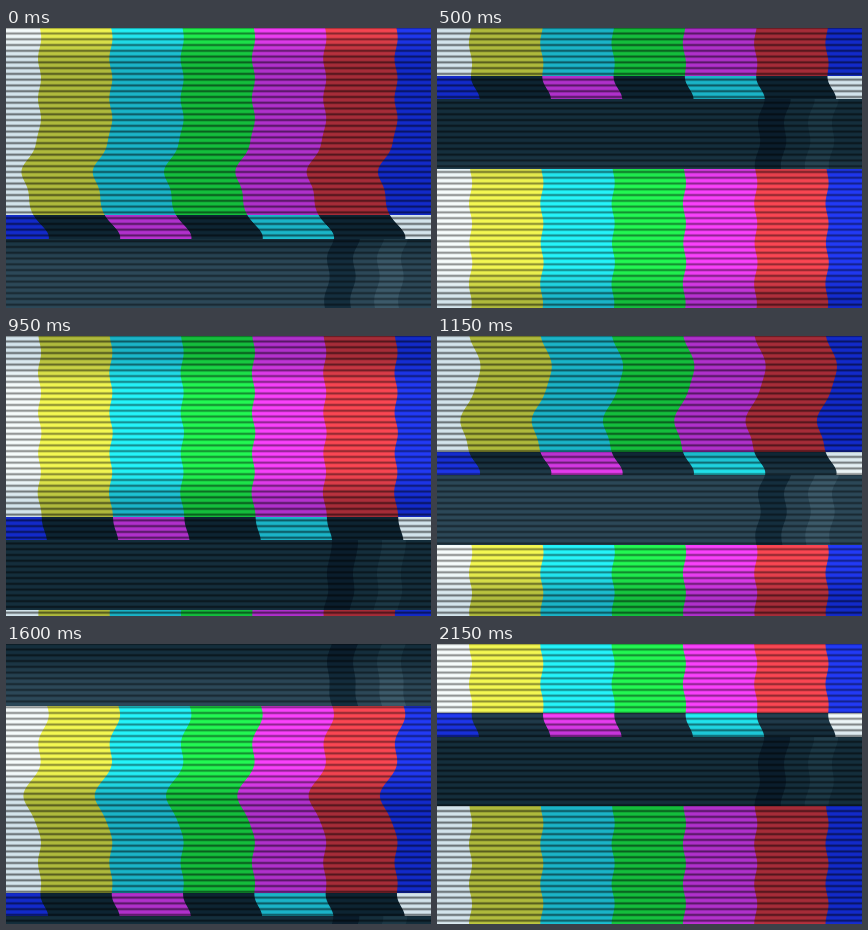
These frames come from a looping animation (425x280 px, 2.2 s). An HTML page with a canvas:

```html
<!DOCTYPE html>
<html lang="en">
<head>
<meta charset="utf-8">
<title>Rolling colour bars</title>
<style>
  html, body { margin: 0; width: 100%; height: 100%; overflow: hidden; background: #0c2230; }
  canvas { display: block; width: 425px; height: 280px; }
</style>
</head>
<body>
<canvas id="screen" width="425" height="280"></canvas>
<script>
const W = 425, H = 280, LOOP = 2200, STEP = 50;
const BAR = 71.3, BARS_END = 187, STRIP_END = 210.5;
const LINE_GAP = 5.77, LINE_START = 5.5;
const ctx = document.getElementById('screen').getContext('2d');

// Each colour: [dim, lit by the passing bright band]
const tone = (dim, lit) => [dim, lit].map(hex =>
  [1, 3, 5].map(i => parseInt(hex.slice(i, i + 2), 16)));
const white = tone('#d3e4ec', '#f6fcfc');
const yellow = tone('#afba3c', '#f4f852');
const cyan = tone('#1ab4c8', '#24f4fa');
const green = tone('#14be3c', '#22f852');
const magenta = tone('#b030cc', '#fa40fc');
const red = tone('#a62c38', '#fa4652');
const blue = tone('#122aca', '#223af6');
const dark = tone('#0d2432', '#264252');
const panel = tone('#142e3c', '#2c4858');
const pit = tone('#0a1d2c', '#142e3e');
const glow = tone('#1c3947', '#3c5a6a');

const bars = [white, yellow, cyan, green, magenta, red, blue];
const strip = [blue, dark, magenta, dark, cyan, dark, white];

// Passing tears in the picture: time in ms, picture row, sideways push
const kinks = [
  [0, 140, -17], [0, 172, -11],
  [250, 112, -8], [250, 190, 8],
  [700, 82, 13], [700, 135, -9],
  [1150, 105, 11], [1150, 160, -10],
  [1600, 5, 9], [1600, 92, -17],
  [1900, 62, 13], [1900, 92, -9], [1900, 163, 12]
];
const KINK_LIFE = 225;

const mod = (n, m) => ((n % m) + m) % m;
const mix = (a, b, k) => a + (b - a) * k;
const smooth = k => {
  k = Math.min(1, Math.max(0, k));
  return k * k * (3 - 2 * k);
};

// Soft bump that wraps round the picture
function bump(row, at, width) {
  const d = mod(row - at + H / 2, H) - H / 2;
  return Math.exp(-((d / width) ** 2));
}

// The picture climbs steadily after a slow start
function rollAt(t) {
  const n = t / STEP;
  return -16.32 * (n - 1.44 * (1 - Math.exp(-n)));
}

// The bright band sinks through the screen
function lightAt(y, t) {
  const centre = 23.9 * t / STEP - 42;
  const gap = Math.abs(mod(y - centre + 160, 320) - 160);
  return smooth((78 - gap) / 40);
}

// Where the first bar ends on a picture row
function edgeAt(row, t) {
  let x = 33.5 + 7 * bump(row, 207, 14) + 4 * bump(row, 240, 28);
  x += 1.5 * Math.sin(row * Math.PI / 20 + t / 90);
  for (const [time, at, push] of kinks) {
    x += push * smooth(1 - Math.abs(t - time) / KINK_LIFE) * bump(row, at, 18);
  }
  return x;
}

function fill(color, light, shade, x, y, w) {
  const rgb = color[0].map((v, i) => Math.round(mix(v, color[1][i], light) * (1 - shade)));
  ctx.fillStyle = `rgb(${rgb})`;
  ctx.fillRect(x, y, w, 1);
}

function drawRow(y, t) {
  const row = mod(y - rollAt(t), H);
  const edge = edgeAt(row, t);
  const light = lightAt(y, t);
  const wave = 0.5 + 0.5 * Math.cos((y + 0.5 - LINE_START) / LINE_GAP * 2 * Math.PI);
  const shade = mix(0.5, 0.42, light) * wave ** 2;

  if (row < STRIP_END) {
    const cells = row < BARS_END ? bars : strip;
    cells.forEach((color, n) => {
      const x = n ? edge + (n - 1) * BAR : 0;
      fill(color, light, shade, x, y, W - x);
    });
  } else {
    fill(panel, light, shade, 0, y, W);
    fill(pit, light, shade, edge + 285, y, 26);
    fill(glow, light, shade, edge + 335, y, 24);
  }
}

const start = performance.now();
let shown = -1;
function tick() {
  const t = Math.floor(mod(performance.now() - start, LOOP) / STEP) * STEP;
  if (t !== shown) {
    shown = t;
    for (let y = 0; y < H; y++) drawRow(y, t);
  }
  requestAnimationFrame(tick);
}
tick();
</script>
</body>
</html>
```
